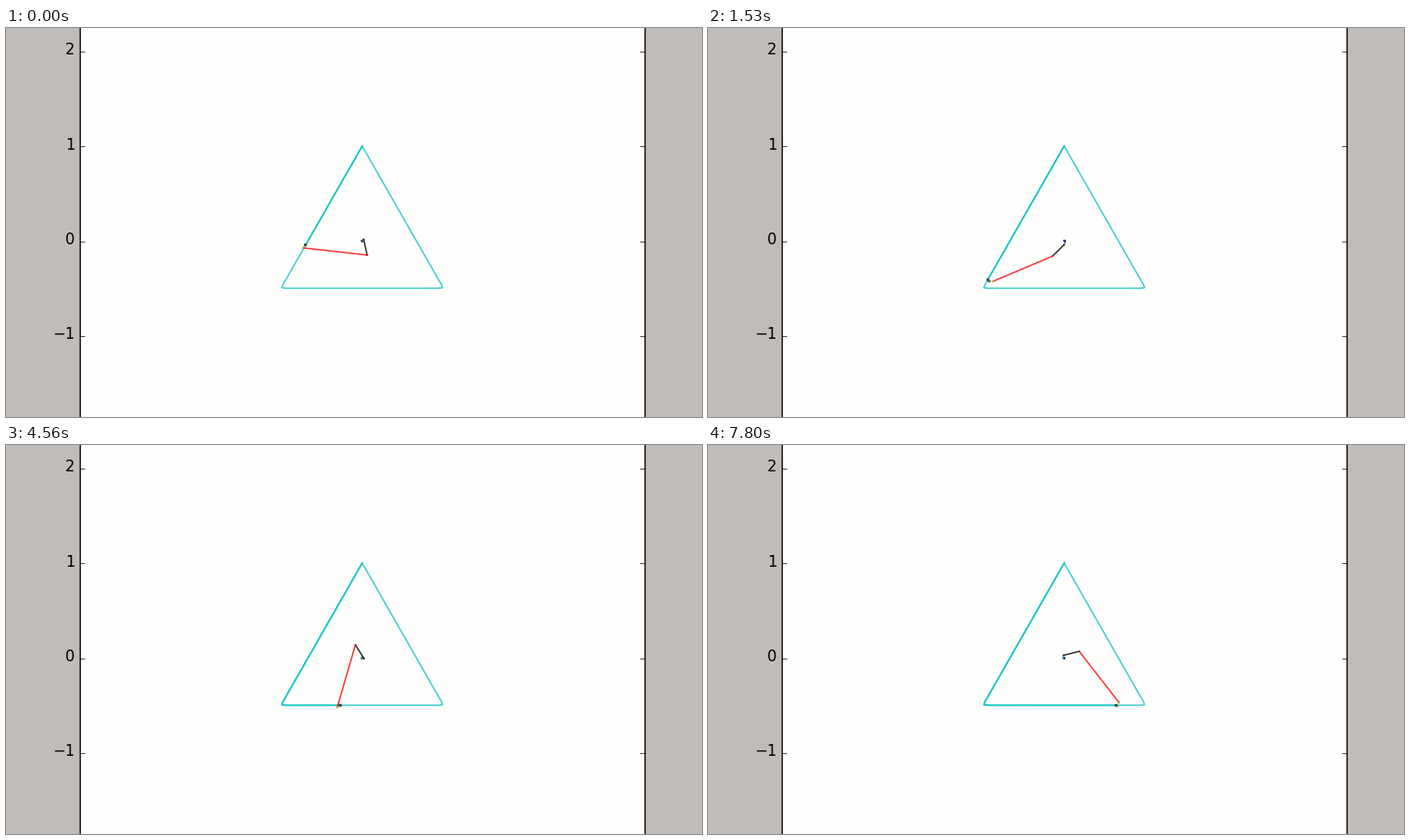
Animation of 764x428 px, one loop 8 s. Source, as a matplotlib script:

```python
from math import floor

import numpy as np
import matplotlib.pyplot as plt
from matplotlib.animation import FuncAnimation
from matplotlib.collections import LineCollection
from matplotlib.patches import Rectangle

W, H, DPI = 764, 428, 100
LOOP, STEP = 8000, 20
CX, CY, UX, UY = 391.0, 234.2, 103.0, 104.3  # origin and pixels per unit
LEFT, RIGHT = 81, 701

# The motion runs on a 30 Hz clock; the arm advances every PACE ticks
CLOCK = 30 / 1000
PACE, PHASE = 6.476, 7.086
CUT = 5  # the one black tick
POSE = 23

N = 100
COLORS = ["bgrcmyk"[i % 7] for i in range(N)]

# Fourier coefficients of a triangle walked at constant speed
corners = 1j * np.exp(2j * np.pi * np.arange(4) / 3)
u = np.arange(N) * 3 / N
walk = np.interp(u, range(4), corners.real) + 1j * np.interp(u, range(4), corners.imag)
freqs = np.arange(-N // 2, N // 2)
coefs = np.fft.fftshift(np.fft.fft(walk)) / N


def arm(angle):
    """Joint positions of the epicycle chain, in pixels."""
    z = np.concatenate([[0], np.cumsum(coefs * np.exp(1j * freqs * angle))])
    return np.column_stack([CX + UX * z.real, CY - UY * z.imag])


chains = [arm(a) for a in np.linspace(0, 2 * np.pi, N)]
path = np.array([c[-1] for c in chains])

fig = plt.figure(figsize=(W / DPI, H / DPI), dpi=DPI, facecolor="#bfbcb9")
ax = fig.add_axes([0, 0, 1, 1])
ax.set(xlim=(0, W), ylim=(H, 0))
ax.axis("off")

ax.add_patch(Rectangle((LEFT, -5), RIGHT - LEFT, H + 10, fc="#fefefd", ec="none"))
pen = dict(color="c", lw=1.2, alpha=.72)
ax.plot(*path.T, **pen)
retrace, = ax.plot([], [], **pen)
arms = LineCollection([], colors=COLORS, linewidths=1.1, alpha=.82,
                      capstyle="projecting", zorder=3)
ax.add_collection(arms, autolim=False)

for x in (LEFT, RIGHT):
    ax.plot([x, x], [-5, H + 5], color="k", lw=1, zorder=4)
for value in (2, 1, 0, -1):
    y = CY - UY * value
    for x, d in ((LEFT, 5), (RIGHT, -5)):
        ax.plot([x, x + d], [y + .5, y + .5], color="k", lw=.5, zorder=4)
    ax.text(75.3, y - 1.4, str(value).replace("-", "\u2212"), ha="right",
            va="center", fontsize=12, family="DejaVu Sans")

cover = ax.add_patch(Rectangle((-5, -5), W + 10, H + 10, fc="k", ec="k", zorder=9))


def draw(i):
    tick = floor((i * STEP + 18) * CLOCK)
    pose = POSE if tick < CUT else POSE + 2 + floor((tick - PHASE) / PACE)
    chain = chains[pose]
    arms.set_segments(np.stack([chain[:-1], chain[1:]], axis=1))
    retrace.set_data(*path[:pose + 1].T)
    cover.set_visible(tick == CUT)
    return arms, retrace, cover


anim = FuncAnimation(fig, draw, frames=LOOP // STEP, interval=STEP,
                     repeat=True, repeat_delay=0)
plt.show()
```
